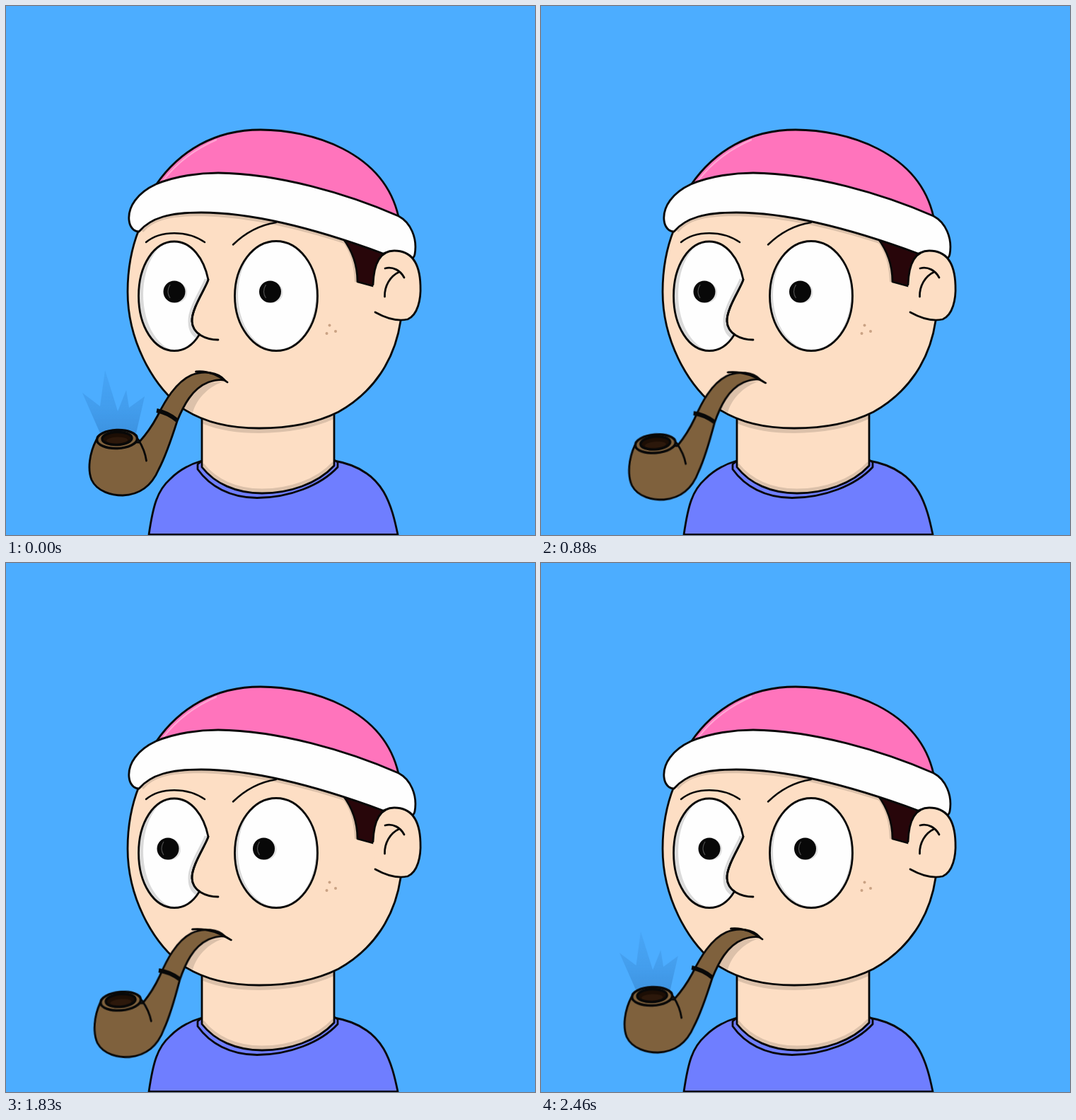
Recreate the animation shown at these times as an HTML page. Size 748x748 px, loop 2.5 s.

```html
<!DOCTYPE html>
<html lang="en">
<head>
<meta charset="utf-8">
<title>Pipe smoker</title>
<style>
html, body { margin: 0; width: 100%; height: 100%; overflow: hidden; background: #4cadff; }
svg { display: block; width: 100vw; height: 100vh; }
.line { fill: none; stroke: #080808; stroke-width: 2.8; stroke-linecap: round; stroke-linejoin: round; }
.skin { fill: #fddec4; }
.white { fill: #fefefe; }
.shade { fill: #dcc1aa; }
.pipe, .mouth, .smoke, .look, .upper, .lower { animation: 2500ms linear infinite; }
.pipe { transform-origin: 290px 520px; animation-name: rock; }
.mouth { transform-origin: 290px 524px; animation-name: lips; }
.smoke { transform-origin: 157px 612px; animation-name: puff; }
.look { animation-name: look; }
.upper { animation-name: upper; }
.lower { animation-name: lower; }

/* 1% = 25 ms; the pose freezes at 21.6-25.2, 43.2-63.2 and 73.2-83.2 */
@keyframes rock {
  0%, 1.6% { transform: rotate(0deg); }
  5.6% { transform: rotate(-1.9deg); }
  9.2%, 11.2% { transform: rotate(-3.1deg); }
  15.2% { transform: rotate(-1.25deg); }
  19.2% { transform: rotate(0deg); }
  21.6%, 25.19% { transform: rotate(-.2deg); }
  25.2% { transform: rotate(-.8deg); }
  32%, 34% { transform: rotate(-3.1deg); }
  35.2% { transform: rotate(-2.85deg); }
  42% { transform: rotate(-.2deg); }
  43.2%, 63.19% { transform: rotate(-.4deg); }
  63.2% { transform: rotate(-1.25deg); }
  68% { transform: rotate(-2.5deg); }
  73.2%, 89.6% { transform: rotate(-3.1deg); }
  91.6% { transform: rotate(-2.85deg); }
  98.4% { transform: rotate(-.1deg); }
  100% { transform: rotate(0deg); }
}
@keyframes lips {
  0%, 1.6% { transform: none; }
  9.2%, 11.2% { transform: translateY(1px) scaleX(1.22); }
  15.2% { transform: translateY(.4px) scaleX(1.09); }
  19.2%, 25.19% { transform: none; }
  32%, 34% { transform: translateY(1px) scaleX(1.22); }
  35.2% { transform: translateY(1px) scaleX(1.19); }
  42%, 63.2% { transform: none; }
  73.2%, 89.6% { transform: translateY(1px) scaleX(1.22); }
  91.6% { transform: translateY(1px) scaleX(1.2); }
  98.4%, 100% { transform: none; }
}
@keyframes puff {
  0% { transform: scale(1); opacity: 1; }
  1.6% { transform: scale(1.02); opacity: .95; }
  7.2% { transform: scale(1.05); opacity: 0; }
  7.3%, 12% { transform: scale(.25); opacity: 0; }
  15.2% { transform: scale(.44); opacity: .7; }
  18.4% { transform: scale(.9); opacity: 1; }
  21.6%, 25.19% { transform: scale(1.01); opacity: 1; }
  25.2% { transform: scale(1.03); opacity: .85; }
  30.4% { transform: scale(1.05); opacity: 0; }
  30.5%, 35.6% { transform: scale(.25); opacity: 0; }
  38% { transform: scale(.44); opacity: .7; }
  41.6% { transform: scale(.95); opacity: 1; }
  43.2%, 63.19% { transform: scale(1.01); opacity: 1; }
  63.2% { transform: scale(1.03); opacity: .85; }
  69.2% { transform: scale(1.05); opacity: 0; }
  69.3%, 92% { transform: scale(.25); opacity: 0; }
  94.4% { transform: scale(.44); opacity: .7; }
  98.4% { transform: scale(.94); opacity: 1; }
  100% { transform: scale(1); opacity: 1; }
}
@keyframes look {
  0%, 25.2% { transform: none; animation-timing-function: ease-in-out; }
  40%, 83.2% { transform: translateX(-9px); }
  97%, 100% { transform: none; }
}
@keyframes upper {
  0%, 83.2% { transform: none; }
  90.6% { transform: translateY(87px); }
  91.6% { transform: translateY(77px); }
  97.8%, 100% { transform: none; }
}
@keyframes lower {
  0%, 83.2% { transform: none; }
  90.6% { transform: translateY(-74px); }
  91.6% { transform: translateY(-66px); }
  97.8%, 100% { transform: none; }
}
</style>
</head>
<body>
<svg viewBox="0 0 748 748" preserveAspectRatio="none">
  <defs>
    <path id="eyeL" d="M238 333C262 333 280 357 286 387C283 398 262 428 263 446C263.500 454 267.600 460.200 273.500 464.400C264 480 252 487.500 238 487.500C209 487.500 187.500 453 187.500 410C187.500 367 209 333 238 333Z"/>
    <ellipse id="eyeR" cx="382" cy="410" rx="58.500" ry="77.500"/>
    <clipPath id="eyes"><use href="#eyeL"/><use href="#eyeR"/></clipPath>
    <path id="head" d="M188 316C176 346 172 375 172 404C172 470 205 535 250 569C280 589 315 597 358 597C400 597 440 589 470 574C520 546 550 500 558 445L572 350L400 260L240 270Z"/>
    <path id="neck" d="M277 575V652C295 675 325 689 362 689C400 689 440 676 464 650V570Z"/>
    <clipPath id="inNeck"><use href="#neck"/></clipPath>
    <g id="pupil">
      <circle cx="3" cy="405" r="15" fill="#e2e2e2"/>
      <circle cy="404" r="15.500" fill="#080808"/>
      <path d="M-6 394Q-12 404-6 413" fill="none" stroke="#4a4a4a" stroke-width="1.300"/>
    </g>
    <linearGradient id="haze" x1="0" y1="0" x2="0" y2="1">
      <stop offset="0" stop-color="#286eb4" stop-opacity=".12"/>
      <stop offset=".6" stop-color="#286eb4" stop-opacity=".24"/>
      <stop offset="1" stop-color="#286eb4" stop-opacity=".4"/>
    </linearGradient>
  </defs>

  <rect width="748" height="748" fill="#4cadff"/>

  <!-- shirt and neck -->
  <path class="line" style="fill:#6f7eff" d="M202 747.500C208 706 214 685 232 669C245 656 260 648 277 643H464C500 649 522 667 534 687C545 706 550 728 554 747.500Z"/>
  <path class="line" style="fill:#6f7eff" d="M276 644L271 648V655C288 679 317 695.500 355 695.500C400 695.500 445 678 469 652V645L464 642"/>
  <use href="#neck" class="skin"/>
  <g clip-path="url(#inNeck)">
    <use href="#head" class="shade" y="7"/>
    <path d="M277 649C295 672 325 686 362 686C400 686 440 673 464 647" fill="none" stroke="#dcc1aa" stroke-width="7"/>
  </g>
  <use href="#neck" class="line"/>

  <!-- head -->
  <use href="#head" class="line" style="fill:#fddec4"/>
  <path d="M192 318C207 299 234 294 276 294C360 296 445 321 500 340" fill="none" stroke="#dcc1aa" stroke-width="6"/>
  <path class="shade" d="M470 326C487 345 492 365 493 390L500 391L505 335Z"/>
  <path class="shade" d="M308 531C290 536 270 553 264 575L247 566L262 535Z"/>

  <!-- eyes -->
  <g clip-path="url(#eyes)">
    <rect x="180" y="325" width="270" height="170" fill="#dadada"/>
    <ellipse class="white" cx="245" cy="408" rx="51" ry="80"/>
    <ellipse class="white" cx="383" cy="408" rx="55" ry="78"/>
    <path d="M286 387C283 398 262 428 263 446C263 458 267 463 276 468" fill="none" stroke="#dadada" stroke-width="11"/>
    <g class="look">
      <use href="#pupil" x="238"/>
      <use href="#pupil" x="373.500"/>
    </g>
    <path class="line upper" style="fill:#f2d5bd" d="M175 200V329.500H385Q425 330 450 338V200Z"/>
    <path class="line lower" style="fill:#f2d5bd" d="M175 620V490H325Q390 494 450 488V620Z"/>
  </g>
  <use href="#eyeL" class="line"/>
  <use href="#eyeR" class="line"/>
  <path class="line" d="M286 387C283 398 262 428 263 446C264 464 283 472 300 472"/>
  <path class="line" style="stroke-width:2.500" d="M198 334C219 317 256 317 281 334M321 337.500C338 321 357 310 382 306"/>
  <g fill="#c9a284">
    <circle cx="457.500" cy="451.500" r="2"/>
    <circle cx="466" cy="460" r="2"/>
    <circle cx="453.500" cy="463" r="2"/>
  </g>

  <!-- hair, hat, ear -->
  <path class="line" style="fill:#28060a" d="M476 328C489 345 497 365 497 390L519 396L545 345Z"/>
  <path class="line" style="fill:#ff74bc" d="M212 253C245 205 295 175 360 175C430 175 534 205 555 298Z"/>
  <path d="M222 247C243 220 270 201 298 189" fill="none" stroke="#ffa6d4" stroke-width="2"/>
  <path class="line" style="fill:#fefefe" d="M212 252C240 240 275 236 300 236C385 237 482 265 555 297C572 306 582 328 578 351Q577 357 572 357L533 350C460 323 360 292 276 292C232 292 205 299 188 319C181 319 175 313 174 303C172 284 186 264 212 252Z"/>
  <path class="line" style="fill:#fddec4" d="M522 433C540 443 555 446 568 443C582 437 587 415 586 395C585 362 572 346 549 346C528 346 520 365 519 394"/>
  <path class="line" d="M536 371C547 368 558 374 563 384M556 376C543 382 535 396 535.500 411"/>

  <!-- pipe -->
  <g class="pipe">
    <path class="smoke" fill="url(#haze)" d="M133 604L108 547L133 566L140 515L158 573L170 543L174 568L196 552L184 604Z"/>
    <path class="line" style="fill:#7f613d" d="M128 613C118 632 115 655 121 670C129 687 150 692 165 692C192 691 207 676 216 655C225 638 234 612 242 587C251 565 263 541 286 532C295 529 303 528 309 529C300 518 280 515 262 522C240 532 225 558 214 580C206 595 198 606 188 617Z"/>
    <path class="line" d="M187 613C192 621 197 632 198.500 643"/>
    <path class="line" style="stroke-width:6;stroke-linecap:butt" d="M213 572Q229 575 242 586"/>
    <g transform="rotate(-2 157 612)">
      <ellipse class="line" style="fill:#7f613d;stroke-width:3.500" cx="157" cy="612.500" rx="28.500" ry="13"/>
      <ellipse class="line" style="fill:#1c0e05;stroke-width:3.500" cx="157" cy="611.500" rx="21" ry="9"/>
      <ellipse cx="157" cy="614" rx="15" ry="4.500" fill="#2c180b"/>
    </g>
  </g>
  <path class="line mouth" d="M268.500 517C286 515 300 522 313 532"/>
</svg>
</body>
</html>
```
